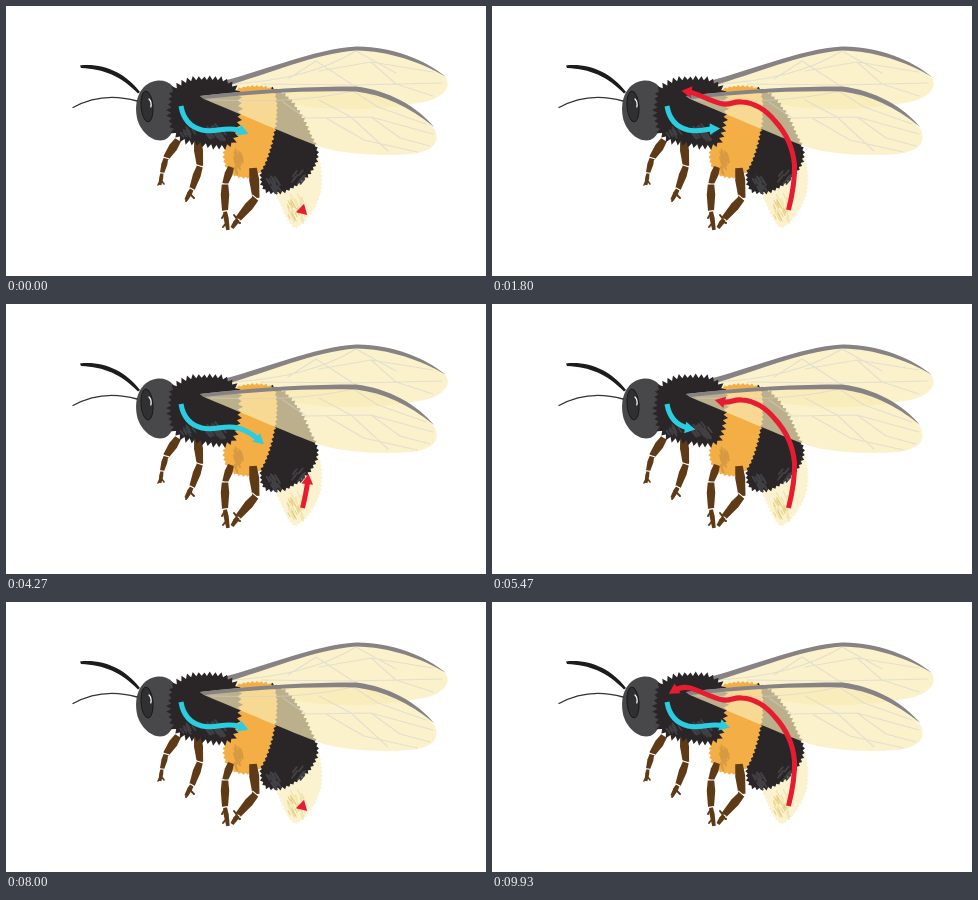
Write an HTML page with a canvas that moves like this. It is 480 by 270 pixels and loops after 9.99 s.

```html
<!DOCTYPE html>
<html lang="en">
<head>
<meta charset="utf-8">
<title>Bee circulation</title>
<style>
html, body { margin: 0; width: 100%; height: 100%; overflow: hidden; background: #fff; }
canvas { display: block; width: 480px; height: 270px; }
</style>
</head>
<body>
<canvas id="stage" width="480" height="270"></canvas>
<script>
const LOOP = 9990, FPS = 15, LAST_STEP = 149, PERIOD = 30;
const LEG = '#5f3a16';
const ctx = document.getElementById('stage').getContext('2d');
const bee = document.createElement('canvas');
bee.width = 480;
bee.height = 270;
const b = bee.getContext('2d');

let seed = 7;
const random = () => (seed = (seed * 16807) % 2147483647) / 2147483647;

function svgPath(d) {
  const path = document.createElementNS('http://www.w3.org/2000/svg', 'path');
  path.setAttribute('d', d);
  return path;
}

function fill(d, color) {
  b.fillStyle = color;
  b.fill(new Path2D(d));
}

function line(d, color, width) {
  b.strokeStyle = color;
  b.lineWidth = width;
  b.lineCap = b.lineJoin = 'round';
  b.stroke(new Path2D(d));
}

// Fills a clockwise outline whose edge is broken into tufts.
function fur(d, color, step, depth) {
  const path = svgPath(d), length = path.getTotalLength();
  const count = Math.round(length / step);
  b.beginPath();
  for (let i = 0; i < count * 2; i++) {
    const s = i * length / count / 2;
    const p = path.getPointAtLength(s), q = path.getPointAtLength(Math.min(s + 1, length));
    const norm = Math.hypot(q.x - p.x, q.y - p.y) || 1;
    const out = i % 2 ? depth * (0.6 + 0.6 * random()) : -depth * 0.35;
    b.lineTo(p.x + (q.y - p.y) / norm * out, p.y - (q.x - p.x) / norm * out);
  }
  b.closePath();
  b.fillStyle = color;
  b.fill();
}

// Scatters short slanted brush marks over an ellipse.
function brush(x, y, rx, ry, count, dx, dy, color, width) {
  for (let i = 0; i < count; i++) {
    const a = random() * Math.PI * 2, r = Math.sqrt(random());
    const px = x + Math.cos(a) * r * rx, py = y + Math.sin(a) * r * ry;
    line(`M${px} ${py} l${dx} ${dy}`, color, width);
  }
}

function limb(d, widths) {
  const points = d.split(' ').map(p => p.split(',').map(Number));
  widths.forEach((w, i) => {
    const [x1, y1] = points[i], [x2, y2] = points[i + 1];
    const n = Math.hypot(x2 - x1, y2 - y1), ux = (x2 - x1) / n, uy = (y2 - y1) / n;
    const px = -uy * w / 2, py = ux * w / 2, mx = x1 + ux * n * 0.4, my = y1 + uy * n * 0.4;
    const shape = `M${x1 + px * 0.75} ${y1 + py * 0.75} L${mx + px} ${my + py}
      L${x2 + px * 0.7} ${y2 + py * 0.7} L${x2 - px * 0.7} ${y2 - py * 0.7}
      L${mx - px} ${my - py} L${x1 - px * 0.75} ${y1 - py * 0.75} Z`;
    fill(shape, LEG);
    if (i) line(`M${x1 + px} ${y1 + py} L${x1 - px} ${y1 - py}`, '#fff', 1.1);
  });
}

function wing(shape, edge, veins, color) {
  fill(shape, color);
  b.save();
  b.clip(new Path2D(shape));
  line(veins, 'rgba(208,208,212,.55)', 1.1);
  b.restore();
  fill(edge, '#878384');
}

function drawBee() {
  wing(
    'M216 77 C255 66 308 43 350 41 C385 40 425 57 440 72 C446 82 436 92 418 96 C375 104 325 107 276 96 C251 91 232 84 216 77 Z',
    'M213 76 C255 66 308 43 350 40.5 C385 40 420 54 440 71 C415 56 383 45 350 44.5 C308 48 262 68 220 80 Z',
    `M226 78 C275 75 315 66 350 45 M282 73 L310 55 L347 79 L436 77 M313 65 L365 56 L427 66
     M347 79 L380 97 M365 56 L390 78 L427 90 M255 78 L347 79 M350 45 L390 67`,
    'rgba(249,235,175,.65)'
  );

  limb('172,134 160,152 156,167 154,179', [9, 6, 4]);
  line('M155 174 l3 4 M154 175 l-2 4', LEG, 1.6);
  limb('191.5,134 194,160 186,183 180,194', [9, 8, 5]);
  line('M184 188 l4 4 M183 190 l-3 5', LEG, 2);

  fur('M298 157 L312 151 C317 164 316 182 313.5 190 C308 204 301 215 290 222 C283 219 279 207 275 199 L270 187 Z', '#fbf2cf', 4, 1.2);
  brush(289, 201, 9, 15, 32, 2.5, 5, '#f0e2aa', 1.2);
  brush(286, 202, 6, 10, 14, 2, 4, '#e5cd7c', 1);

  fur('M264 82 C277 84 287 96 294 108 C302 122 307 135 311.5 145 C312 158 303 170 295 175 C285 184 274 189 260 185 C254 180 254 169 257 157 Z', '#2a2628', 4.5, 2);
  brush(266, 177, 7, 7, 15, 3, 5, '#424145', 2);
  brush(290, 174, 8, 5, 8, 4, -5, '#424145', 1.7);

  fur('M231 83 C245 79 257 80 267 83 C273 95 271 116 266 135 C262 151 259 160 253 167 C244 174 233 172 223 166 C218 158 216 149 221 137 Z', '#f4ae46', 4.5, 1.5);
  brush(231, 153, 5, 11, 22, 2, 6, '#d79a43', 1.7);

  limb('225,161 219,178 219,205 222,224', [8, 8.5, 5]);
  line('M219 207 l-3 5 M221 216 l-4 5', LEG, 2);
  limb('247,162 250,192 232,213 226,222', [10, 9, 5]);
  line('M231 213 l-3 -4 M230 215 l4 2', LEG, 2);

  fill('M152 74.5 C164 74 172 82 172 96 C172 115 167 131 158 134 C146 137 134 125 131 112 C127 92 136 76 152 74.5 Z', '#48484a');
  b.beginPath();
  b.ellipse(141, 100.5, 6, 15.5, -0.08, 0, Math.PI * 2);
  b.fillStyle = '#302f31';
  b.fill();
  b.strokeStyle = '#1b191a';
  b.lineWidth = 1;
  b.stroke();
  line('M143 93 C145 95 145.5 98 144.8 101', '#fff', 1.2);

  fur('M166 85 C176 75 190 71 202 73 C215 72 224 75 230 83 C236 96 233 123 226 138 C214 143 202 139 190 136 C178 136 169 131 166 122 C163 109 164 94 166 85 Z', '#2a2628', 5.5, 3.5);
  brush(208, 126, 9, 8, 18, 4, 5, '#414145', 2);
  brush(180, 124, 7, 5, 10, 3, 4, '#414145', 1.7);

  fill('M74 59.5 C98 57 119 67 134 86 L132 87.5 C115 70 98 63 75 62 Z', '#1e1b1c');
  line('M131 95 C108 88.5 86 91 67 101.5', '#353334', 1.4);

  wing(
    'M194 90 C245 84 310 81 350 81.5 C385 84 418 108 429 124 C434 137 427 145 406 148 C374 150 344 149 318 142 C292 133 248 114 198 93 Z',
    'M194 90 C243 84 305 80 350 80.5 C382 84 412 101 428 121 C402 100 378 89 350 85.5 C300 84 245 88 198 93 Z',
    `M205 94 C260 95 300 96 347 85 M277 96 L300 112 L365 111 L427 128 M313 94 L345 111 L382 145
     M320 112 L358 134 L411 146 M347 85 L372 101 L420 118 M365 111 L394 132 L424 140`,
    'rgba(249,236,181,.7)'
  );
}

function makeArrow(d, color, offset) {
  const path = svgPath(d);
  return { path, shape: new Path2D(d), length: path.getTotalLength(), color, offset };
}

const arrows = [
  makeArrow('M175 100 C177 112 184 121 196 124 C210 127 219 120 232 124 C247 128 258 140 266 150 C274 161 280 171 283.5 181', '#2bcde0', 15),
  makeArrow('M296.5 204 C300 190 303 174 302.5 159 C301 141 294 127 283 115 C274 104 264 97 250 96 C241 95 240 99 231 98 C221 96 212 91 204 88 C195 84 185 84 177 93', '#e81c30', 0)
];

function drawArrow({ path, shape, length, color, offset }, step) {
  const s = length * ((step + offset) % PERIOD) / PERIOD;
  const p = path.getPointAtLength(s);
  const from = path.getPointAtLength(Math.max(0, s - 2)), to = path.getPointAtLength(Math.min(length, s + 2));
  ctx.strokeStyle = ctx.fillStyle = color;
  if (s > 0) {
    ctx.lineWidth = 5;
    ctx.setLineDash([s, length + 10]);
    ctx.stroke(shape);
  }
  ctx.save();
  ctx.translate(p.x, p.y);
  ctx.rotate(Math.atan2(to.y - from.y, to.x - from.x));
  ctx.beginPath();
  ctx.moveTo(6.5, 0);
  ctx.lineTo(-3.8, -5.8);
  ctx.lineTo(-3.8, 5.8);
  ctx.closePath();
  ctx.fill();
  ctx.restore();
}

function render() {
  const t = performance.now() % LOOP;
  const step = Math.min(LAST_STEP, Math.floor((t + 5) * FPS / 1000));
  ctx.fillStyle = '#fff';
  ctx.fillRect(0, 0, 480, 270);
  ctx.drawImage(bee, 0, 0);
  for (const arrow of arrows) drawArrow(arrow, step);
  requestAnimationFrame(render);
}

drawBee();
render();
</script>
</body>
</html>
```
